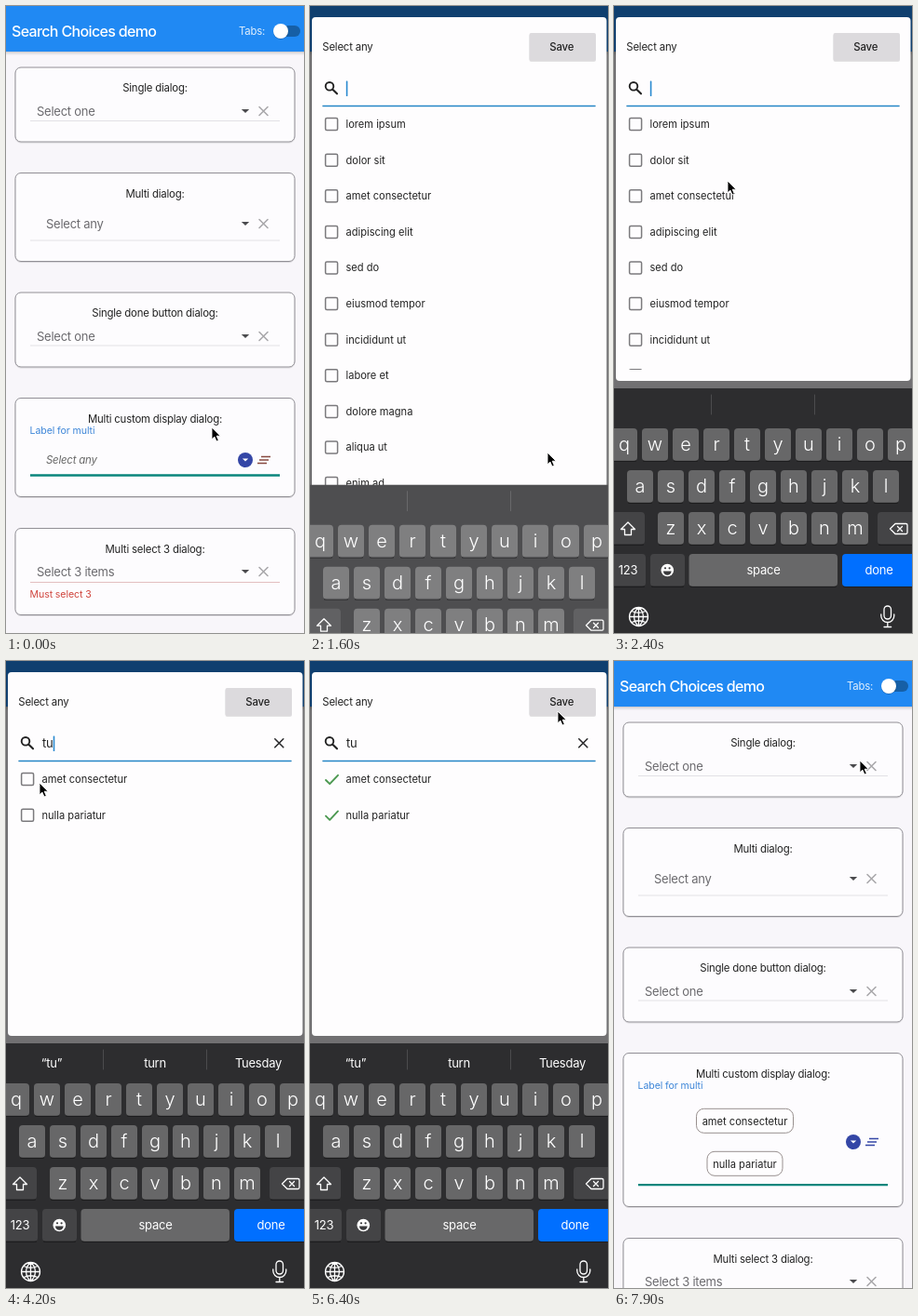
An HTML page that plays this animation: 320 px wide and 674 px high, repeating every 8 s.

```html
<!DOCTYPE html>
<html lang="en">
<head>
<meta charset="utf-8">
<title>Search Choices demo</title>
<style>
html, body { margin: 0; width: 100%; height: 100%; overflow: hidden; background: #f8f6fa; }
svg { display: block; width: 100vw; height: 100vh; }
text { font-family: Inter, Roboto, sans-serif; white-space: pre; }
.title { font-size: 16px; font-weight: 500; letter-spacing: -.65px; fill: #fff; }
.label { font-size: 11.4px; letter-spacing: -.2px; fill: #222; }
.field { font-size: 13px; letter-spacing: -.25px; fill: #6b6a6e; }
.small { font-size: 10.6px; letter-spacing: -.1px; }
.item { font-size: 11.1px; fill: #222; }
.key { font-size: 20px; font-weight: 300; fill: #fff; }
.word { font-size: 13px; letter-spacing: -.25px; fill: #fff; }
.mid { text-anchor: middle; }
.line { fill: none; stroke-linecap: round; stroke-linejoin: round; }
</style>
</head>
<body>
<svg id="stage" viewBox="0 0 320 674"></svg>
<script>
const LOOP = 8000;
const ITEMS = ['lorem ipsum', 'dolor sit', 'amet consectetur', 'adipiscing elit', 'sed do',
  'eiusmod tempor', 'incididunt ut', 'labore et', 'dolore magna', 'aliqua ut', 'enim ad',
  'minim veniam', 'quis nostrud', 'exercitation ullamco', 'nulla pariatur'];
const CHECKED = { 'amet consectetur': 4700, 'nulla pariatur': 5700 };
const TYPE_T = 2900, TYPE_U = 3720, SAVE = 7280;
const POINTER = [[100, 221, 453], [600, 255, 480], [1700, 255, 480], [2400, 122, 188],
  [3500, 110, 180], [4200, 36, 131], [4500, 24, 127], [5000, 24, 127], [5500, 25, 165],
  [6000, 27, 166], [6400, 266, 54], [6900, 266, 48], [7400, 266, 46], [7900, 264, 107]];

const text = (x, y, cls, str, more = '') => `<text x="${x}" y="${y}" class="${cls}" ${more}>${str}</text>`;
const rect = (x, y, w, h, r, fill, more = '') =>
  `<rect x="${x}" y="${y}" width="${w}" height="${h}" rx="${r}" fill="${fill}" ${more}/>`;
const path = (d, stroke, width, more = '') =>
  `<path class="line" d="${d}" stroke="${stroke}" stroke-width="${width}" ${more}/>`;
const group = (id, body, more = '') => `<g id="${id}" ${more}>${body}</g>`;
const cross = (x, y, color, r = 4.5) =>
  path(`M${x - r} ${y - r}l${2 * r} ${2 * r}m0 ${-2 * r}l${-2 * r} ${2 * r}`, color, 1.6);
const arrow = (x, y, w, fill) => `<path d="M${x - w} ${y - w / 2}h${2 * w}l${-w} ${w}z" fill="${fill}"/>`;

const card = (y, h, label) =>
  rect(10, y + 1, 300, h, 6, 'none', 'stroke="#000" stroke-opacity=".12"') +
  rect(10, y, 300, h, 6, '#fdfcfe', 'stroke="#918f95"') +
  text(160, y + 26.3, 'label mid', label);

const dropdown = (x, y, hint, lineY, color = '#e2e1e5') =>
  text(x, y + 4.5, 'field', hint) + arrow(257, y, 4.2, '#4a4a4d') + cross(276.5, y, '#a9a8ab') +
  `<path d="M26 ${lineY}H294" stroke="${color}"/>`;

const customField = (y, lineY, color) =>
  `<circle cx="257" cy="${y}" r="8" fill="#3446a6"/>` + arrow(257, y, 3.2, '#fff') +
  path(`M274 ${y - 3.5}h10M272 ${y}h10M270 ${y + 3.5}h10`, color, 1.7, 'style="stroke-linecap:butt"') +
  `<path d="M26 ${lineY}H294" stroke="#0b867c" stroke-width="2.3"/>`;

const chip = (x, y, w, str) =>
  rect(x, y, w, 26, 8, '#fefdfe', 'stroke="#98908f"') + text(x + w / 2, y + 17.2, 'item mid', str);

function page() {
  return rect(0, 0, 320, 674, 0, '#f8f6fa') +
    rect(0, 49, 320, 1.5, 0, '#000', 'opacity=".16"') + rect(0, 50.5, 320, 2, 0, '#000', 'opacity=".06"') +
    rect(0, 0, 320, 49, 0, '#2089f3') +
    text(6, 32.5, 'title', 'Search Choices demo') +
    text(250, 31, 'label', 'Tabs:', 'style="fill:#e0effd"') +
    rect(288, 21, 28, 12, 6, '#165fa6') + '<circle cx="295" cy="27.8" r="8.2" fill="#000" opacity=".2"/>' +
    '<circle cx="295" cy="27" r="8" fill="#fff"/>' +
    card(66, 80, 'Single dialog:') + dropdown(33, 113, 'Select one', 123.5) +
    card(179.5, 95, 'Multi dialog:') + dropdown(43, 234, 'Select any', 252) +
    card(308, 80, 'Single done button dialog:') + dropdown(33, 355, 'Select one', 365) +
    group('empty', card(421.5, 106, 'Multi custom display dialog:') +
      text(43, 491.7, 'label', 'Select any', 'style="fill:#666;font-style:italic"') +
      customField(488, 504.5, '#87483f')) +
    group('filled', card(421.5, 165, 'Multi custom display dialog:') +
      chip(88.5, 481.3, 104, 'amet consectetur') + chip(100, 527.3, 81, 'nulla pariatur') +
      customField(517, 563.2, '#3446a6')) +
    text(25.5, 460, 'small', 'Label for multi', 'fill="#3d86d8"') +
    group('last', card(561.5, 93, 'Multi select 3 dialog:') +
      dropdown(33, 608, 'Select 3 items', 619.5, '#e3bfc0') +
      text(25.5, 635.5, 'small', 'Must select 3', 'fill="#d0453d"'));
}

function dialog() {
  const rows = ITEMS.map(name => `<g class="row">` +
    `<g>${rect(16.6, -6.4, 13, 13, 1.5, 'none', 'stroke="#7b7a7d" stroke-width="1.5"')}</g>` +
    path('M17 1l4.2 4.2L30-4.2', '#4b9850', 1.9) +
    text(38.5, 4, 'item', name) + '</g>').join('');
  return rect(2, 12, 316.5, 391, 4, '#fefdfe', 'id="sheet"') +
    text(13.3, 47.5, 'label', 'Select any') +
    rect(235.5, 30, 71.5, 30, 2, '#000', 'opacity=".1"') + rect(235.5, 29, 71.5, 30, 2, '#dcdadd') +
    text(270.3, 47.5, 'label mid', 'Save', 'font-weight="500"') +
    '<circle cx="21" cy="86.3" r="4.3" fill="none" stroke="#222" stroke-width="1.9"/>' +
    path('M24.6 90L29 94.3', '#222', 2.1) +
    '<path d="M13.5 107.5H306.5" stroke="#a5a4a7"/>' +
    '<path id="focus" d="M13.5 107.5H306.5" stroke="#2486c6" stroke-width="1.7"/>' +
    text(39, 93, 'field', '', 'id="query" style="fill:#222"') +
    rect(0, 80.5, 1.6, 16.5, .6, '#2a8ad0', 'id="caret"') +
    group('clear', cross(293.3, 88.3, '#2c2c2e')) +
    `<g clip-path="url(#listClip)">${rows}</g>`;
}

function keyboard() {
  const key = (x, y, w, body, fill = '#fff', alpha = .28) =>
    rect(x + 1, y + 34, w - 2, 2, 1, '#000', 'opacity=".35"') +
    rect(x, y, w, 35, 4, fill, `fill-opacity="${alpha}"`) + body;
  const row = (chars, x, y) => [...chars].map((c, i) =>
    key(x + i * 33 - 14, y, 28, text(x + i * 33, y + 24, 'key mid', c))).join('');
  const face = '<circle cx="57.3" cy="606.5" r="6.8" fill="#fff"/>' +
    '<path d="M53 607.5h8.6a4.3 4.3 0 0 1-8.6 0z" fill="#3a3a3c"/>' +
    '<circle cx="55" cy="604.3" r="1.1" fill="#3a3a3c"/><circle cx="59.6" cy="604.3" r="1.1" fill="#3a3a3c"/>';
  return rect(0, 411, 320, 300, 0, '#2d2d2f', 'id="board"') +
    path('M104.5 418V439M215.5 418V439', '#fff', 1, 'opacity=".15"') +
    [49, 160, 271].map(x => text(x, 437, 'word mid', '', 'data-hint')).join('') +
    row('qwertyuiop', 11, 454) + row('asdfghjkl', 28, 499) + row('zxcvbnm', 61, 544) +
    key(-8, 544, 41, path('M15 555l7.5 7.5h-4v6h-7v-6h-4z', '#fff', 1.3), '#fff', .11) +
    key(283, 544, 45, path('M302 556.5h11.5q1.5 0 1.5 1.5v8q0 1.5-1.5 1.5H302l-5.500-5.500z' +
      'M304.500 559.500l5 5m0-5l-5 5', '#fff', 1.3), '#fff', .11) +
    key(-8, 589, 42, text(15, 611, 'word mid', '123'), '#fff', .11) +
    key(39, 589, 37, face, '#fff', .11) +
    key(80.5, 589, 159.500, text(160.500, 611, 'word mid', 'space')) +
    key(245, 589, 85, text(284.500, 611, 'word mid', 'done'), '#006fff', 1) +
    path('M16.500 656.500a10 10 0 1 0 20 0a10 10 0 1 0-20 0zh20M26.500 646.500v20' +
      'c-6.500-5-6.500-15 0-20c6.500 5 6.500 15 0 20M19 650.500q7.500 3.500 15 0M19 662.500q7.500-3.500 15 0', '#fff', 1.3) +
    rect(290, 645, 7.500, 14, 3.7, 'none', 'stroke="#fff" stroke-width="1.3"') +
    path('M286.800 654v1.500a7 7 0 0 0 14 0V654M293.800 662.500v5M290 667.500h7.600', '#fff', 1.3);
}

const stage = document.getElementById('stage');
stage.innerHTML =
  `<defs><clipPath id="listClip"><rect id="listBox" x="2" y="110" width="316" height="281"/></clipPath></defs>` +
  page() + rect(0, 0, 320, 674, 0, '#000', 'id="scrim"') + group('dialog', dialog()) +
  group('keyboard', keyboard()) +
  group('pointer', '<path d="M0 0V12.800L2.900 10.100L5 15L7.300 14L5.200 9.200H9.200Z" fill="#000" stroke="#fff" stroke-width=".9"/>');

const $ = id => document.getElementById(id);
const set = (id, attrs) => Object.entries(attrs).forEach(([k, v]) => $(id).setAttribute(k, v));
const show = (el, on) => { el.style.display = on ? '' : 'none'; };
const span = (t, start, length) => Math.min(1, Math.max(0, (t - start) / length));
const easeOut = u => 1 - (1 - u) ** 3;
const smooth = u => u * u * (3 - 2 * u);
const mix = (a, b, u) => a + (b - a) * u;
const rows = [...document.querySelectorAll('.row')];
const hints = [...document.querySelectorAll('[data-hint]')];
const HINTS = { '': ['', '', ''], t: ['“t”', 'the', 'to'], tu: ['“tu”', 'turn', 'Tuesday'] };

function pointerAt(t) {
  const i = POINTER.findIndex(p => p[0] > t);
  if (i === 0) return POINTER[0].slice(1);
  if (i < 0) return POINTER.at(-1).slice(1);
  const [a, b] = [POINTER[i - 1], POINTER[i]];
  const u = smooth(span(t, a[0], b[0] - a[0]));
  return [mix(a[1], b[1], u), mix(a[2], b[2], u)];
}

function draw(t) {
  const saved = t >= SAVE;
  show($('empty'), !saved);
  show($('filled'), saved);
  set('last', { transform: `translate(0 ${saved ? 59 : 0})` });

  const open = span(t, 950, 130) * (1 - span(t, SAVE, 138));
  set('scrim', { opacity: open * .54 });
  set('dialog', { opacity: open });

  const shrink = easeOut(span(t, 1630, 170));
  const bottom = mix(672, 403, shrink);
  set('sheet', { height: bottom - 12 });
  set('listBox', { height: bottom - 122 });

  const query = t < TYPE_T ? '' : t < TYPE_U ? 't' : 'tu';
  $('query').textContent = query;
  show($('clear'), query);
  set('focus', { opacity: span(t, 1250, 150) });
  const blinkFrom = t < TYPE_T ? 1380 : t < TYPE_U ? TYPE_T : TYPE_U;
  show($('caret'), t >= 1380 && (t - blinkFrom) % 1000 < 500 || t >= 2380 && t < 2400);
  set('caret', { x: [38.8, 43.5, 50.7][query.length] });

  let line = 0;
  ITEMS.forEach((name, i) => {
    const match = name.includes(query);
    show(rows[i], match);
    if (!match) return;
    rows[i].setAttribute('transform', `translate(0 ${127 + 38.6 * line++})`);
    const on = t >= (CHECKED[name] ?? LOOP);
    show(rows[i].children[0], !on);
    show(rows[i].children[1], on);
  });

  // The keyboard is translucent, so its shade follows what lies below it.
  const up = easeOut(span(t, 1505, 360)) * (1 - smooth(span(t, 7410, 370)));
  const below = mix(248, mix(255, 114, shrink), open);
  const shade = Math.round(18 + .235 * below);
  show($('keyboard'), up > 0);
  set('keyboard', { transform: `translate(0 ${263 * (1 - up)})` });
  set('board', { fill: `rgb(${shade},${shade},${shade + 2})` });
  hints.forEach((el, i) => { el.textContent = HINTS[query][i]; });

  set('pointer', { transform: `translate(${pointerAt(t).join(' ')})` });
}

function tick() {
  draw(performance.now() % LOOP);
  requestAnimationFrame(tick);
}
tick();
</script>
</body>
</html>
```
